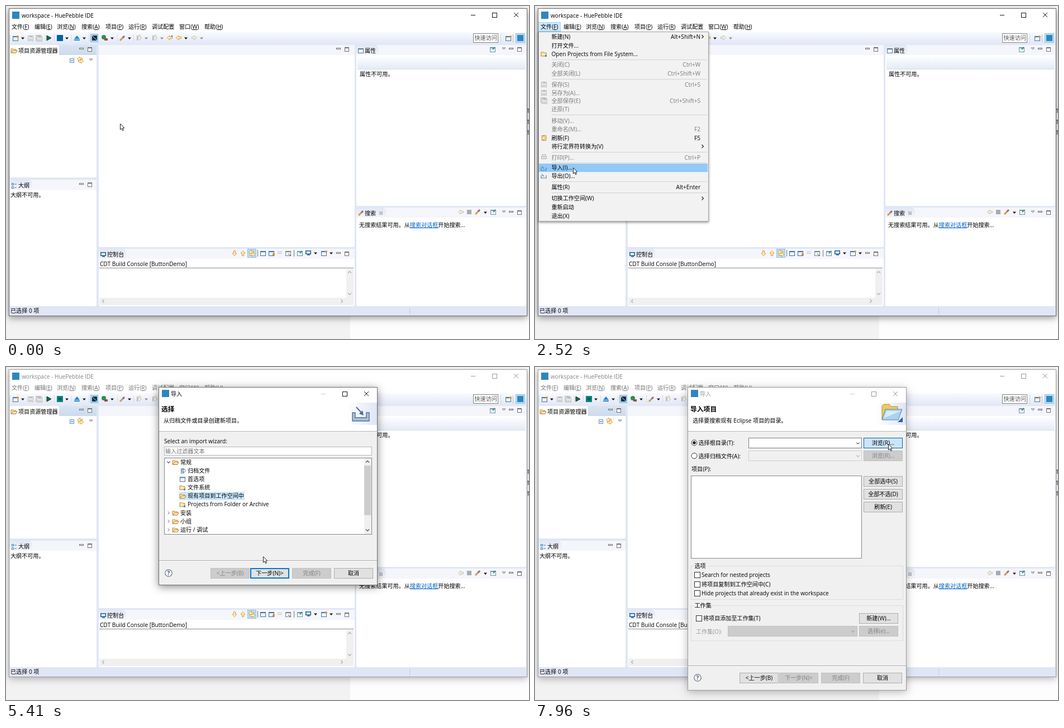
Animation of 936 by 598 pixels, one loop 8 s. Source, as an HTML page with a canvas:

```html
<!DOCTYPE html>
<html lang="zh-CN">
<head>
<meta charset="utf-8">
<title>Import wizard</title>
<style>
html, body { margin: 0; width: 100%; height: 100%; overflow: hidden; background: #fff; }
canvas { display: block; width: 936px; height: 598px; }
</style>
</head>
<body>
<canvas id="stage" width="936" height="598"></canvas>
<script>
const W = 936, H = 598, LOOP = 8000;
const FAMILY = '"Open Sans", "Noto Sans CJK SC", "Noto Sans CJK", sans-serif';
const BLUE = '#0078d7', LOGO = '#2f86bd', GOLD = '#d9982b', GREY = '#7b7b7b', PALE = '#bcbcbc';
const stage = document.getElementById('stage');
const layer = document.createElement('canvas');
layer.width = W; layer.height = H;
let g = stage.getContext('2d');

const clamp = (v) => Math.max(0, Math.min(1, v));
const ramp = (t, a, b) => clamp((t - a) / (b - a));
const inside = (p, x, y, w, h) => p.x >= x && p.x < x + w && p.y >= y && p.y < y + h;

// Drawing helpers
function box(x, y, w, h, fill, stroke, lw = 1) {
  if (fill) { g.fillStyle = fill; g.fillRect(x, y, w, h); }
  if (stroke) {
    g.strokeStyle = stroke; g.lineWidth = lw;
    g.strokeRect(x + lw / 2, y + lw / 2, w - lw, h - lw);
  }
}
function path(pts, fill, stroke, lw = 1, close = true) {
  g.beginPath();
  for (let i = 0; i < pts.length; i += 2) g.lineTo(pts[i], pts[i + 1]);
  if (close) g.closePath();
  if (fill) { g.fillStyle = fill; g.fill(); }
  if (stroke) { g.strokeStyle = stroke; g.lineWidth = lw; g.stroke(); }
}
const line = (x1, y1, x2, y2, c, lw = 1) => path([x1, y1, x2, y2], null, c, lw, false);
function disc(x, y, r, fill, stroke, lw = 1) {
  g.beginPath(); g.arc(x, y, r, 0, Math.PI * 2);
  if (fill) { g.fillStyle = fill; g.fill(); }
  if (stroke) { g.strokeStyle = stroke; g.lineWidth = lw; g.stroke(); }
}
function text(s, x, cy, color = '#000', align = 'left', size = 10.1, weight = '') {
  g.font = `${weight} ${size}px ${FAMILY}`;
  g.textAlign = align;
  g.fillStyle = color;
  g.fillText(s, x, cy + size * .36);
  return g.measureText(s).width;
}
function shade(x, y, w, h, top, bottom) {
  const grad = g.createLinearGradient(0, y, 0, y + h);
  grad.addColorStop(0, top); grad.addColorStop(1, bottom);
  box(x, y, w, h, grad);
}
function shadowed(blur, dy, alpha, draw) {
  g.save();
  g.shadowColor = `rgba(0,0,0,${alpha})`; g.shadowBlur = blur; g.shadowOffsetY = dy;
  draw();
  g.restore();
}
function fade(alpha, scale, draw) {
  if (alpha <= 0) return;
  if (alpha >= 1 && scale === 1) return draw();
  const main = g;
  g = layer.getContext('2d');
  g.clearRect(0, 0, W, H);
  draw();
  g = main;
  g.save();
  g.globalAlpha = alpha;
  g.translate(469, 214); g.scale(scale, scale); g.translate(-469, -214);
  g.drawImage(layer, 0, 0);
  g.restore();
}

// Small icons, centred on x, y
const drop = (x, y, c = '#111') => path([x - 3, y - 1.5, x + 3, y - 1.5, x, y + 2], c);
function chevron(x, y, turn, c = '#444', r = 3) {
  g.save(); g.translate(x, y); g.rotate(turn * Math.PI / 2);
  path([-r / 2, -r, r / 2, 0, -r / 2, r], null, c, 1.1, false);
  g.restore();
}
function arrow(x, y, turn, c = GOLD) {
  g.save(); g.translate(x, y); g.rotate(turn * Math.PI / 2);
  path([-4.5, -1.5, 0, -1.5, 0, -4, 4.5, 0, 0, 4, 0, 1.5, -4.5, 1.5], '#fff3cf', c);
  g.restore();
}
function sheet(x, y, c = '#3f6f9f', fill = '#eef4fb') {
  box(x - 5, y - 4, 10, 9, fill, c);
  line(x - 4, y - 2.5, x + 4, y - 2.5, c);
}
function newSheet(x, y) {
  sheet(x, y, '#4b7398');
  disc(x + 4, y - 3, 2, GOLD);
}
function disk(x, y) {
  box(x - 5, y - 5, 10, 10, '#e8e8e8', PALE);
  box(x - 2, y - 5, 5, 3, PALE); box(x - 3, y + 1, 6, 4, '#d0d0d0');
}
function disks(x, y) { disk(x - 1, y - 1); disk(x + 1, y + 1); }
function folder(x, y, open) {
  path([x - 5, y + 4, x - 5, y - 3, x - 1, y - 3, x, y - 2, x + 4, y - 2, x + 4, y + 4], '#ffe7ad', '#b9812d');
  if (open) path([x - 4, y + 4, x - 2, y, x + 6, y, x + 4, y + 4], '#fff0c9', '#b9812d');
  else box(x + 2, y + 2, 3, 3, '#5380b0');
}
function pencil(x, y) {
  line(x - 4, y + 4, x + 3, y - 3, '#d39a45', 3);
  line(x + 1, y - 1, x + 4, y - 4, '#8e6d8d', 3);
}
function swap(x, y) { arrow(x - 1, y - 2, 2); arrow(x + 1, y + 2, 0); }
function screen(x, y, c = '#1f5f93') {
  box(x - 5, y - 4, 10, 7, '#eaf5ff', c, 1.5); line(x - 2, y + 4, x + 3, y + 4, c, 1.5);
}
function pin(x, y) { sheet(x, y, '#6d93b2'); line(x, y, x + 4, y - 4, '#2c9a61', 2); }
function tray(x, y, c = '#4d80ad') {
  path([x - 4, y - 1, x - 4, y + 4, x + 5, y + 4, x + 5, y - 1], null, c, 1.2, false);
  line(x - 3, y - 3, x + 1, y + 1, c, 1.2);
}
function dots(x, y, h, c = '#a5abbd') { for (let i = 0; i < h; i += 3) box(x, y + i, 1, 1, c); }
const minBtn = (x, y) => box(x - 4, y - 2, 8, 3, '#fff', '#707070');
function maxBtn(x, y) { box(x - 4, y - 4, 8, 8, '#fff', '#707070'); line(x - 4, y - 2.5, x + 4, y - 2.5, '#707070'); }
const logo = (x, y, s = 13) => box(x, y, s, s, LOGO);

function captionButtons(xs, y, c, minColor = c) {
  line(xs[0] - 4, y + .5, xs[0] + 4, y + .5, minColor);
  box(xs[1] - 4, y - 4, 9, 9, null, c);
  line(xs[2] - 4, y - 4, xs[2] + 4, y + 4, c); line(xs[2] + 4, y - 4, xs[2] - 4, y + 4, c);
}

// Main window
function pane(x, y, w, h) {
  g.beginPath(); g.roundRect(x, y, w, h, 3);
  g.fillStyle = '#fff'; g.fill();
  box(x, y, w, 18, '#f5f6fb');
}
function tab(x, y, w, title, active) {
  const grad = g.createLinearGradient(0, y, 0, y + 18);
  grad.addColorStop(0, active ? '#fff' : '#e1e7f5'); grad.addColorStop(1, active ? '#fff' : '#f3f5fb');
  path([x, y + 18, x, y, x + w - 4, y, x + w, y + 5, x + w, y + 18], grad);
  text(title, x + 15, y + 10);
}

const MENUS = [[10, '文件', 'F'], [51, '编辑', 'E'], [91, '浏览', 'N'], [135, '搜索', 'A'], [178, '项目', 'P'],
  [219, '运行', 'R'], [261, '调试配置', ''], [310, '窗口', 'W'], [355, '帮助', 'H']];

function menuBar(color, lit) {
  if (lit) box(5, 29, 41, 17, '#cce8ff', '#99d1ff');
  for (const [x, name, key] of MENUS) {
    text(key ? `${name}(${key})` : name, x, 37, color);
    if (!key) continue;
    const at = x + g.measureText(name + '(').width;
    line(at, 42.5, at + g.measureText(key).width, 42.5, color);
  }
}

function toolBar(inactive) {
  shade(6, 47, 926, 23, '#f8fafd', '#e1e6f6');
  for (const x of [7, 70, 86, 117, 148, 199, 228]) dots(x, 52, 12);
  newSheet(17, 58); disk(44, 58); disks(59, 58);
  path([73, 53, 81, 57.5, 73, 62], '#196a3c', '#143f2a');
  box(91, 52, 11, 11, inactive ? '#08867a' : '#0063a6');
  if (inactive) { line(95, 55, 95, 60, '#123'); line(98, 55, 98, 60, '#123'); }
  path([122, 59, 127, 53, 132, 59], '#1688d1'); box(122, 60, 10, 2, '#1688d1');
  box(151, 50, 14, 15, '#a9d8f7', '#83bce4');
  box(154, 53, 9, 9, '#18313f'); line(154, 53, 163, 62, '#d8e7ee');
  disc(175, 56, 4, '#2f8d57'); box(176, 58, 6, 4, '#9d4b3c');
  pencil(208, 58);
  for (const x of [237, 265]) { line(x - 2, 53, x - 2, 62, PALE, 2); arrow(x + 2, 57, 1, PALE); }
  arrow(293, 57, 2); disc(297, 54, 1.5, '#5e8aac'); arrow(309, 57, 2); arrow(337, 57, 0, PALE);
  for (const x of [30, 109, 140, 190, 221, 322]) drop(x, 58);
  for (const x of [251, 279, 350]) drop(x, 58, '#8b8b8b');
  box(836, 49, 45, 17, '#fff', '#858585');
  text('快速访问', 838.5, 57.5, '#555');
  dots(885, 50, 16); newSheet(899, 58); line(907.5, 51, 907.5, 65, '#b9bfce');
  box(912, 49, 17, 17, '#b9def8', '#8cc4ea'); logo(915, 52, 11);
}

function mainWindow(inactive, lit) {
  box(0, 0, W, H, '#fdfdfd');
  box(0, 0, 5, H, '#f2f2f2'); box(0, 556, 616, 42, '#f2f2f2');
  for (const y of [188, 208, 227]) { line(933, y - 3, 936, y - 3, '#333'); line(934.5, y - 3, 934.5, y + 4, '#333'); }
  shadowed(12, 3, inactive ? .28 : .42, () => box(5, 4, 928, 553, '#e1e6f6'));
  const ink = inactive ? '#858585' : '#000';
  box(5, 4, 928, 43, '#fff');
  logo(11, 10);
  text('workspace - HuePebble IDE', 28, 17, ink);
  captionButtons([836, 874, 913], 16, inactive ? '#999' : '#111');
  menuBar(inactive ? '#737373' : '#000', lit);
  toolBar(inactive);

  pane(7, 70, 155, 238); shade(95, 70, 67, 18, '#d9e4f2', '#cbdaec');
  tab(7, 70, 88, '项目资源管理器', true);
  folder(14, 80, true);
  box(114, 94, 8, 8, '#edf6ff', '#5c92bd'); line(116, 98, 120, 98, '#285d8e'); swap(133, 97);
  path([149, 95, 155, 95, 152, 98], '#fff', '#777');
  pane(7, 312, 155, 227); tab(7, 312, 40, '大纲');
  box(10, 318, 4, 4, null, '#3d86b8'); box(10, 324, 4, 4, null, '#3d86b8');
  line(15, 320, 19, 320, '#3d86b8'); line(15, 326, 19, 326, '#3d86b8');
  text('大纲不可用。', 8, 339.5);
  pane(166, 70, 458, 363);
  pane(627, 70, 304, 289); tab(627, 70, 40, '属性'); sheet(635, 80, '#607890');
  shade(629, 90, 301, 23, '#fdfeff', '#e4ebf5'); line(629, 113.5, 930, 113.5, '#d7dfed');
  text('属性不可用。', 633, 122.5);
  pin(871, 78);

  pane(627, 362, 304, 177); tab(627, 362, 53, '搜索'); pencil(635, 372);
  text('☒', 671, 372, '#777', 'center', 8);
  arrow(814, 370, 2, PALE); box(825, 366, 8, 8, '#aaa'); pencil(844, 370); drop(858, 371); pin(872, 370);
  let x = 632;
  x += text('无搜索结果可用。从', x, 393);
  const w = text('搜索对话框', x, 393, '#0066cc');
  line(x, 398.5, x + w, 398.5, '#0066cc');
  text('开始搜索...', x + w, 393);

  pane(166, 436, 458, 103); tab(166, 436, 49, '控制台'); screen(174, 446);
  arrow(409, 444, 1); arrow(424, 444, 3);
  box(432, 436, 16, 16, '#b9def8', '#8cc4ea'); swap(440, 444);
  line(450.5, 438, 450.5, 450, '#777');
  sheet(460, 444); sheet(475, 444); box(477, 444, 4, 4, GOLD);
  for (const y of [441.5, 444.5]) line(486, y, 494, y, PALE);
  sheet(505, 444, '#77818b'); line(505, 445, 510, 449, '#555');
  line(515.5, 438, 515.5, 450, '#777');
  pin(526, 444); screen(541, 443); drop(554, 444); newSheet(569, 444); drop(582, 444);
  text('CDT Build Console [ButtonDemo]', 168, 463.5);
  line(167, 470.5, 622, 470.5, '#888');
  box(609, 472, 13, 52, '#f0f0f0'); box(167, 524, 455, 13, '#f0f0f0');
  chevron(174, 530, 2, '#aaa'); chevron(601, 530, 0, '#aaa');
  chevron(615, 478, 3, '#aaa'); chevron(615, 517, 1, '#aaa');

  for (const [a, b] of [[135, 77], [595, 77], [904, 77], [135, 320], [904, 370], [595, 444]]) {
    minBtn(a, b); maxBtn(a + 15.5 | 0, b + 1);
  }
  for (const y of [75, 368]) path([888, y, 894, y, 891, y + 3], '#fff', '#777');
  text('已选择 0 项', 8, 547.5);
  dots(722, 543, 12, '#8f95a8');
  box(5, 4, 928, 553, null, inactive ? '#9a9a9a' : '#6b6b6b');
}

// File menu: [centre y, label, shortcut, enabled, has submenu]
const ITEMS = [[55, '新建(N)', 'Alt+Shift+N', 1, 1], [71, '打开文件...', '', 1], [86, 'Open Projects from File System...', '', 1],
  [105.5, '关闭(C)', 'Ctrl+W'], [121.5, '全部关闭(L)', 'Ctrl+Shift+W'], [141.5, '保存(S)', 'Ctrl+S'], [156, '另存为(A)...', ''],
  [170.5, '全部保存(E)', 'Ctrl+Shift+S'], [185.5, '还原(T)', ''], [206, '移动(V)...', ''], [221.5, '重命名(M)...', 'F2'],
  [237, '刷新(F)', 'F5', 1], [252, '将行定界符转换为(V)', '', 1, 1], [272, '打印(P)...', 'Ctrl+P'], [290.5, '导入(I)...', '', 1],
  [305.5, '导出(O)...', '', 1], [325, '属性(R)', 'Alt+Enter', 1], [345.5, '切换工作空间(W)', '', 1, 1],
  [361, '重新启动', '', 1], [377, '退出(X)', '', 1]];

function menu(p) {
  shadowed(4, 2, .4, () => box(6, 46, 305, 341, '#f2f2f2'));
  box(6, 46, 305, 341, '#f2f2f2', '#a5a5a5');
  for (const y of [96, 131, 195, 262, 281, 315, 335]) line(30, y + .5, 308, y + .5, '#d2d2d2');
  for (const [y, label, keys, on, sub] of ITEMS) {
    if (p.y > 46 && Math.abs(p.y - y) <= 7.5) box(7, Math.round(y - 7.5), 302, 15, '#91c9f7');
    const ink = on ? '#000' : GREY;
    text(label, 29.5, y, ink);
    text(keys, 296, y, ink, 'right');
    if (sub) chevron(300, y, 0, '#222');
  }
  folder(16, 86); disk(16, 141); disk(16, 156); disks(16, 170);
  box(12, 232, 8, 10, '#fff2d5', '#b98a43'); arrow(16, 237, 2);
  box(11, 269, 10, 6, '#ddd', PALE); box(13, 266, 6, 4, '#eee', PALE);
  tray(15, 291); tray(15, 305);
}

// Wizard dialog
const DISABLED = 0, NORMAL = 1, DEFAULT = 2, HOT = 3;
function button(x, y, w, label, mode = NORMAL) {
  const fill = ['#cccccc', '#e1e1e1', '#e1e1e1', '#cce4f7'][mode];
  box(x, y, w, 19, fill, ['#bfbfbf', '#adadad', BLUE, '#0064ad'][mode], mode === DEFAULT ? 2 : 1);
  text(label, x + w / 2, y + 9.5, mode ? '#000' : '#838383', 'center');
}
function footer(y, back, next) {
  disc(291, y + 9, 6.2, '#fff', '#667080', 1.2);
  text('?', 291, y + 9, '#44566c', 'center', 10, 'bold');
  button(366, y, 70, '<上一步(B)', back); button(437, y, 70, '下一步(N)>', next);
  button(512, y, 70, '完成(F)', DISABLED); button(587, y, 70, '取消');
}
function bannerArt(useFolder) {
  const grad = g.createLinearGradient(610, 0, 664, 0);
  grad.addColorStop(0, '#fff'); grad.addColorStop(1, '#dfe5f5');
  box(610, 64, 54, 40, grad);
  if (useFolder) {
    path([621, 94, 621, 70, 624, 67, 634, 67, 637, 71, 649, 71, 649, 94], '#f0c95f', '#b08a35');
    path([621, 95, 627, 76, 657, 76, 650, 95], '#a9d3ef', '#5286ae');
    path([624, 92, 629, 79, 654, 79], '#d8eefb');
    path([649, 99, 658, 99, 658, 90], '#2465a5');
  } else {
    path([620, 82, 625, 82, 625, 91, 645, 91, 645, 82, 650, 82, 650, 97, 620, 97], '#a9c1dd', '#4f6f98', 1.4);
    line(627, 72, 637, 83, '#47709e', 2);
    path([640, 87, 632, 84, 638, 78], '#47709e');
  }
}
function dialogFrame(h, title, desc, useFolder, active) {
  shadowed(14, 3, active ? .45 : .28, () => box(273, 36, 392, h, '#f0f0f0'));
  box(273, 36, 392, h, '#f0f0f0'); box(273, 36, 392, 79, '#fff');
  line(273, 115.5, 665, 115.5, '#b9b9b9');
  logo(279, 41); text('导入', 295, 48.5, active ? '#000' : '#999');
  captionButtons([568, 606, 645], 48, active ? '#111' : '#999', '#ccc');
  text(title, 278, 75.5, '#000', 'left', 11.8, 'bold');
  text(desc, 282, 96.5);
  bannerArt(useFolder);
  const bottom = 36 + h - 45;
  line(274, bottom + .5, 664, bottom + .5, '#a8a8a8'); line(274, bottom + 1.5, 664, bottom + 1.5, '#fff');
  box(273, 36, 392, h, null, active ? '#6f6f6f' : '#999');
}

// [label, depth, expanded]
const TREE = [['常规', 0, 1], ['归档文件', 1], ['首选项', 1], ['文件系统', 1], ['现有项目到工作空间中', 1],
  ['Projects from Folder or Archive', 1], ['安装', 0], ['小组', 0], ['运行 / 调试', 0], ['C', 0], ['XML', 0]];

function wizardPage(t, p) {
  dialogFrame(356, '选择', '从归档文件或目录创建新项目。', false, true);
  text('Select an import wizard:', 283, 133.5);
  box(283, 143, 372, 16, '#fff', t < 3900 ? '#a9bfd0' : '#b5b5b5');
  if (t < 3900) box(284.5, 145, 71, 12, '#2f8cdb');
  text('输入过滤器文本', 285, 151.5, t < 3900 ? '#fff' : '#707070');
  box(283, 163, 372, 138, '#fff', '#828790');
  const top = t < 4270 ? 2 : 0;
  TREE.slice(top, top + 9).forEach(([label, depth, open], i) => {
    const y = 171 + i * 15.15, x = 312 + depth * 13;
    g.font = `10.1px ${FAMILY}`;
    const w = g.measureText(label).width + 16;
    const hot = p.x >= x - 15 && p.x < x + w - 13 && Math.abs(p.y - y) < 7.5 && t > 3470 && (t < 4270 || t > 4470);
    const chosen = label === TREE[4][0];
    if (chosen) box(x - 15, y - 7.5, w, 15, t < 3580 ? '#d9d9d9' : '#cce8ff');
    else if (hot) box(x - 15, y - 7.5, w, 15, '#e5f3ff');
    if (!depth) { chevron(291, y, open ? 1 : 0, open ? '#333' : '#999', 2.6); folder(303, y, true); }
    else if (label === '首选项') sheet(316, y, '#46739d');
    else if (label === '归档文件') { box(313, y - 4, 5, 9, '#e4ebf3', '#607b98'); disc(318, y, 3, null, '#607b98'); }
    else folder(316, y, chosen);
    text(label, x, y);
  });
  box(641, 164, 13, 136, '#f0f0f0');
  box(641, top ? 197 : 177, 12, 89, '#cdcdcd');
  chevron(647, 170, 3); chevron(647, 293, 1);
  footer(361, DISABLED, inside(p, 437, 361, 70, 19) ? HOT : DEFAULT);
}

function combo(x, y, w, enabled, focus) {
  box(x, y, w, 19, enabled ? '#fff' : '#f0f0f0', focus ? BLUE : enabled ? '#7a7a7a' : '#cfcfcf');
  chevron(x + w - 7, y + 10, 1, enabled ? '#444' : '#aaa', 2.6);
}
function radio(y, label, on) {
  disc(285, y, 5, '#fff', '#333'); if (on) disc(285, y, 2.8, '#222');
  text(label, 292.5, y + .5);
}
function check(x, y, label) { box(x, y - 5, 11, 11, '#fff', '#333'); text(label, x + 13, y + .5); }
function group(y, h, label) {
  box(279, y, 380, h, null, '#dcdcdc');
  box(284, y - 2, 25, 4, '#f0f0f0');
  text(label, 285.5, y);
}

function projectPage(t, p) {
  const ready = t >= 6430, focus = t < 7350, active = t < 7650;
  dialogFrame(545, '导入项目', ready ? '选择要搜索现有 Eclipse 项目的目录。' : '', ready, active);
  radio(136, '选择根目录(T):', true);
  radio(159.5, '选择归档文件(A):', false);
  combo(382, 127, 203, true, focus); combo(382, 150, 203, false, false);
  if (focus && Math.floor((t - 6300) / 530) % 2 === 0) line(385.5, 130, 385.5, 142, '#000');
  button(588, 127, 70, '浏览(R)...', inside(p, 588, 127, 70, 19) ? HOT : NORMAL);
  button(588, 150, 70, '浏览(R)...', DISABLED);
  text('项目(P):', 280, 183);
  box(279, 195, 306, 149, '#fff', '#828790');
  if (!ready) {
    staleParts();
    footer(549, DISABLED, HOT);
    return;
  }
  ['全部选中(S)', '全部不选(D)', '刷新(E)'].forEach((s, i) => button(588, 196 + i * 23, 70, s));
  group(357, 61, '选项');
  check(285, 373, 'Search for nested projects');
  check(285, 390, '将项目复制到工作空间中(C)');
  check(285, 406, 'Hide projects that already exist in the workspace');
  group(428, 64, '工作集');
  check(288, 451, '将项目添加至工作集(T)');
  button(580, 442, 70, '新建(W)...');
  text('工作集(O):', 288, 475, '#9a9a9a');
  box(345, 465, 232, 19, '#cccccc', '#bfbfbf'); chevron(569, 475, 1, '#999', 2.6);
  button(580, 465, 70, '选择(e)...', DISABLED);
  footer(549, NORMAL, DISABLED);
}

// Leftovers of the first page while the second one is being painted
function staleParts() {
  box(588, 195, 67, 67, '#fff'); box(640, 195, 13, 67, '#cdcdcd'); line(654.5, 195, 654.5, 262, '#828790');
  g.save();
  g.beginPath(); g.rect(274, 366, 383, 15); g.clip();
  footer(361, DISABLED, HOT);
  g.restore();
  for (const y of [367, 383, 400]) box(641, y, 12, 13, '#cdcdcd');
  line(640.5, 440, 640.5, 490, '#f8f8f8');
  chevron(647, 481, 1);
}

// Pointer route: [time, x, y]
const ROUTE = [[0, 204, 211], [180, 204, 211], [760, 32, 32], [1440, 32, 32], [1630, 37, 63.5], [2210, 64, 274],
  [2260, 64, 274], [2520, 68, 290], [2710, 68, 290], [2970, 71, 290], [3470, 335, 181], [3520, 335, 181],
  [3650, 365, 204], [4470, 365, 204], [4650, 322, 170], [4790, 322, 170], [5590, 480, 365], [5660, 480, 365],
  [5800, 489, 374], [6490, 489, 374], [7250, 632, 138], [8000, 632, 138]];

function slope(i, k) {
  const a = ROUTE[i - 1], b = ROUTE[i], c = ROUTE[i + 1];
  if (!a || !c || a[k] === b[k] || b[k] === c[k]) return 0;
  return (c[k] - a[k]) / (c[0] - a[0]);
}
function pointer(t) {
  let i = 0;
  while (i < ROUTE.length - 2 && t >= ROUTE[i + 1][0]) i++;
  const a = ROUTE[i], b = ROUTE[i + 1], d = b[0] - a[0], u = (t - a[0]) / d;
  const at = (k) => {
    const s = u * u * (3 - 2 * u);
    return a[k] + (b[k] - a[k]) * s + d * u * (1 - u) * (slope(i, k) * (1 - u) - slope(i + 1, k) * u);
  };
  return { x: at(1), y: at(2) };
}
function drawPointer(p) {
  g.save(); g.translate(Math.round(p.x) + .5, Math.round(p.y) + .5);
  path([0, 0, 0, 10.5, 2.5, 8.3, 4.2, 12.2, 5.8, 11.5, 4.2, 7.7, 7.3, 7.5], '#fff', '#222');
  g.restore();
}

function render(t) {
  const p = pointer(t);
  const inactive = t >= 2860;
  mainWindow(inactive, t < 2760 && (t >= 1050 || inside(p, 5, 29, 41, 17)));
  if (t >= 1050 && t < 2760) fade(ramp(t, 1000, 1240), 1, () => menu(p));
  if (t >= 2760 && t < 3010) fade(.9 * (1 - ramp(t, 2760, 3010)), 1, () => {
    box(7, 283, 302, 15, '#91c9f7'); tray(15, 291); text('导入(I)...', 29.5, 290.5);
  });
  if (t >= 2860) {
    const u = ramp(t, 2860, 3080), ease = 1 - (1 - u) ** 3;
    fade(ease * 1.02, .9 + .1 * ease, () => (t < 6300 ? wizardPage : projectPage)(t, p));
  }
  drawPointer(p);
}

function tick() {
  render(performance.now() % LOOP);
  requestAnimationFrame(tick);
}
tick();
</script>
</body>
</html>
```
